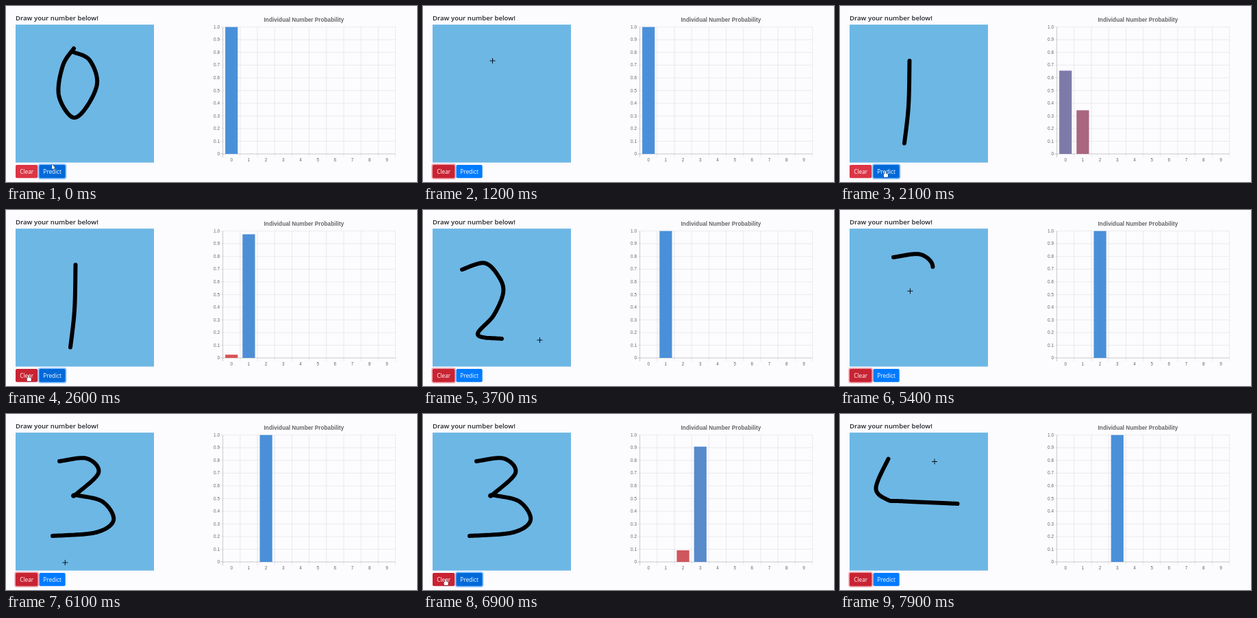
Recreate the animation shown at these times as an HTML page with a canvas. Size 600x257 px, loop 8000 ms.

```html
<!DOCTYPE html>
<html lang="en">
<head>
<meta charset="utf-8">
<title>Draw a number</title>
<style>
  html, body { margin: 0; width: 100%; height: 100%; overflow: hidden; background: #fcfbfe; }
  canvas, svg { position: absolute; left: 0; top: 0; width: 600px; height: 257px; }
  .ui { font-family: "Open Sans", "Noto Sans", sans-serif; }
  .chart { font-family: "Liberation Sans", Arial, sans-serif; fill: #666; }
</style>
</head>
<body>
<canvas id="scene"></canvas>
<svg id="labels" viewBox="0 0 600 257">
  <text class="ui" x="14" y="21" font-size="9.65" font-weight="600" fill="#212529">Draw your number below!</text>
  <text class="ui" x="30.2" y="245" font-size="8.2" text-anchor="middle" fill="#fff">Clear</text>
  <text class="ui" x="67.6" y="245" font-size="8.2" text-anchor="middle" fill="#fff">Predict</text>
  <text class="chart" x="435" y="23" font-size="8.25" font-weight="700" text-anchor="middle">Individual Number Probability</text>
</svg>
<canvas id="pointer"></canvas>
<script>
const W = 600, H = 257, LOOP = 8000, STEP = 100;
const PAD = { x: 14, y: 27.2, w: 202, h: 201.4 };
const CHART = { x: 316.6, top: 30.7, base: 216, cell: 25.2, bar: 18.2 };
const BUTTON = { y: 232, h: 19.3 };
const CLEAR = { x: 14, w: 32.3, idle: "#dc3545", dark: "#c82333", ring: "rgba(225,83,97,.5)" };
const PREDICT = { x: 48.5, w: 38.2, idle: "#007bff", dark: "#0069d9", ring: "rgba(38,143,255,.5)" };
const BLUE = [74, 144, 217], RED = [222, 80, 80];
const BAR_TIME = 1000, INK_LAG = 150;

// pen: time span of the stroke, rest: pointer stop after it, then the button clicks
const DIGITS = [
  { pen: [-1000, -500], clear: 700,
    pts: [[99, 62], [83, 87], [77, 130], [96, 162], [115, 151], [133, 113], [122, 79], [99, 67.5]] },
  { pen: [1230, 1600], predict: 2000, clear: 2750,
    pts: [[101.5, 80], [100, 146], [94, 200.5]] },
  { pen: [2920, 3690], rest: [3700, 170.5, 190], predict: 4130, clear: 4800,
    pts: [[57, 87], [90, 77.5], [111, 98], [117, 121], [103, 154], [80, 182], [115, 188], [159, 189.3]] },
  { pen: [5080, 5830], rest: [6100, 86.3, 217], predict: 6450, clear: 7050,
    pts: [[78, 69], [118, 65], [135, 86], [102, 117.5], [103, 118.5], [141, 128], [157, 155], [131, 173], [68, 178]] },
  { pen: [7220, 7650], rest: [7900, 138, 69.5],
    pts: [[70.5, 65.5], [52.5, 108], [69, 125], [90, 127.3], [171.5, 131]] }
];
const CLEARS = DIGITS.flatMap(d => d.clear ?? []);
const PREDICTS = DIGITS.flatMap(d => d.predict ?? []);

const clamp = v => Math.min(1, Math.max(0, v));
const mix = (a, b, k) => a + (b - a) * k;
const past = (times, t) => times.filter(v => v <= t);
const inside = (p, x, y, w, h) => p.x >= x && p.x <= x + w && p.y >= y && p.y <= y + h;

// Catmull-Rom curve sampled with running length
function trace(p) {
  const out = [];
  let len = 0;
  for (let i = 0; i < p.length - 1; i++) {
    const a = p[Math.max(0, i - 1)], b = p[i], c = p[i + 1], d = p[Math.min(p.length - 1, i + 2)];
    for (let j = i ? 1 : 0; j <= 16; j++) {
      const u = j / 16;
      const [x, y] = [0, 1].map(k => 0.5 * (2 * b[k] + (c[k] - a[k]) * u +
        (2 * a[k] - 5 * b[k] + 4 * c[k] - d[k]) * u * u +
        (3 * b[k] - a[k] - 3 * c[k] + d[k]) * u * u * u));
      const last = out[out.length - 1];
      if (last) len += Math.hypot(x - last.x, y - last.y);
      out.push({ x, y, len });
    }
  }
  return out;
}

function partial(path, k) {
  const goal = k * path[path.length - 1].len;
  const n = path.findIndex(p => p.len >= goal - 1e-6);
  if (n < 1) return path.slice(0, 1);
  const a = path[n - 1], b = path[n];
  const u = (goal - a.len) / (b.len - a.len || 1);
  return [...path.slice(0, n), { x: mix(a.x, b.x, u), y: mix(a.y, b.y, u) }];
}

// Pointer stops: rest on each button around its click, follow the pen in between
const stops = [[0, 67, 231]];
const press = (t, x) => stops.push([t - 150, x, 241], [t + 50, x, 241]);
for (const d of DIGITS) {
  d.path = trace(d.pts);
  const [start, end] = d.pen;
  if (start > 0) stops.push([start - 50, ...d.pts[0]], [start, ...d.pts[0]], [end, ...d.pts.at(-1)]);
  if (d.rest) stops.push(d.rest);
  if (d.predict) press(d.predict, 67);
  if (d.clear) press(d.clear, 33);
}
stops.push([LOOP, 138, 69.5]);

function pointerAt(t) {
  const d = DIGITS.find(d => t >= d.pen[0] && t <= d.pen[1]);
  if (d) return partial(d.path, (t - d.pen[0]) / (d.pen[1] - d.pen[0])).pop();
  const i = stops.findIndex(s => s[0] > t);
  const a = stops[i - 1], b = stops[i];
  const u = (t - a[0]) / (b[0] - a[0]), k = u * u * (3 - 2 * u);
  return { x: mix(a[1], b[1], k), y: mix(a[2], b[2], k) };
}

function setup(id) {
  const c = document.getElementById(id), r = window.devicePixelRatio || 1;
  c.width = W * r;
  c.height = H * r;
  const ctx = c.getContext("2d");
  ctx.scale(r, r);
  return ctx;
}
const g = setup("scene"), top2d = setup("pointer");

function label(x, y, text, anchor) {
  const el = document.createElementNS("http://www.w3.org/2000/svg", "text");
  Object.entries({ x, y, class: "chart", "font-size": 6.4, "text-anchor": anchor })
    .forEach(([k, v]) => el.setAttribute(k, v));
  el.textContent = text;
  document.getElementById("labels").append(el);
}
const rowY = i => mix(CHART.base, CHART.top, i / 10);
const midX = i => CHART.x + CHART.cell * (i + 0.5);
for (let i = 0; i <= 10; i++) {
  label(312, rowY(i) + 2.2, i ? (i / 10).toFixed(1) : "0", "end");
  if (i < 10) label(midX(i), 227, i, "middle");
}

function rule(x1, y1, x2, y2, alpha) {
  g.strokeStyle = `rgba(0,0,0,${alpha})`;
  g.lineWidth = 0.8;
  g.beginPath();
  g.moveTo(x1, y1);
  g.lineTo(x2, y2);
  g.stroke();
}

function drawChart(t) {
  const right = CHART.x + CHART.cell * 10;
  for (let i = 0; i <= 10; i++) {
    const x = CHART.x + CHART.cell * i, y = rowY(i), alpha = i ? 0.09 : 0.25;
    rule(x, CHART.top, x, CHART.base + 5, alpha);
    rule(CHART.x - 4, y, right, y, alpha);
  }
  const now = past(PREDICTS, t).length;
  const k = now ? 1 - (1 - clamp((t - PREDICTS[now - 1]) / BAR_TIME)) ** 4 : 1;
  const bar = (n, value) => {
    const h = (CHART.base - CHART.top) * value;
    g.fillStyle = `rgb(${RED.map((c, i) => Math.round(mix(c, BLUE[i], value)))})`;
    g.fillRect(midX(n) - CHART.bar / 2, CHART.base - h, CHART.bar, h);
  };
  if (k < 1) bar(now - 1, 1 - k);
  bar(now, k);
}

function drawPad(t) {
  g.fillStyle = "#6db7e5";
  g.fillRect(PAD.x, PAD.y, PAD.w, PAD.h);
  const { path, pen: [start, end] } = DIGITS[past(CLEARS, t).length];
  const k = clamp((t - start - INK_LAG) / (end - start));
  if (!k) return;
  g.strokeStyle = "#000";
  g.lineWidth = 6;
  g.lineCap = g.lineJoin = "round";
  g.beginPath();
  partial(path, k).forEach(p => g.lineTo(p.x, p.y));
  g.stroke();
  g.lineCap = "butt";
}

function box(x, y, w, h, r, fill) {
  g.fillStyle = fill;
  g.beginPath();
  g.roundRect(x, y, w, h, r);
  g.fill();
}

function drawButton(b, focus, p) {
  const { y, h } = BUTTON, ring = 1.7;
  if (focus) box(b.x - ring, y - ring, b.w + 2 * ring, h + 2 * ring, 3.4, b.ring);
  box(b.x, y, b.w, h, 2, focus || inside(p, b.x, y, b.w, h) ? b.dark : b.idle);
}

function drawPointer(p) {
  const c = top2d;
  c.clearRect(0, 0, W, H);
  c.save();
  c.translate(p.x, p.y);
  c.beginPath();
  if (inside(p, PAD.x, PAD.y, PAD.w, PAD.h)) {
    c.strokeStyle = "#000";
    c.lineWidth = 0.9;
    c.moveTo(-4, 0);
    c.lineTo(4, 0);
    c.moveTo(0, -4);
    c.lineTo(0, 4);
    c.stroke();
  } else {
    c.fillStyle = "#fff";
    c.strokeStyle = "#222";
    c.lineWidth = 0.8;
    if (p.y >= BUTTON.y) {
      c.roundRect(-0.8, 0, 1.6, 6, 0.8);
      c.roundRect(-2.4, 3.8, 6.2, 5.2, 1.6);
    } else {
      [[0, 0], [0, 7.5], [1.8, 6], [3, 8.4], [4, 8], [2.9, 5.5], [5, 5.2]].forEach(q => c.lineTo(...q));
      c.closePath();
    }
    c.stroke();
    c.fill();
  }
  c.restore();
}

function draw(t) {
  g.fillStyle = "#fcfbfe";
  g.fillRect(0, 0, W, H);
  drawChart(t);
  drawPad(t);
  const p = pointerAt(t);
  const cleared = past(CLEARS, t).length > past(PREDICTS, t).length;
  drawButton(CLEAR, cleared, p);
  drawButton(PREDICT, !cleared, p);
  drawPointer(p);
}

const begin = performance.now();
function frame() {
  const t = (performance.now() - begin) % LOOP;
  draw(Math.floor(t / STEP) * STEP);
  requestAnimationFrame(frame);
}
frame();
</script>
</body>
</html>
```
